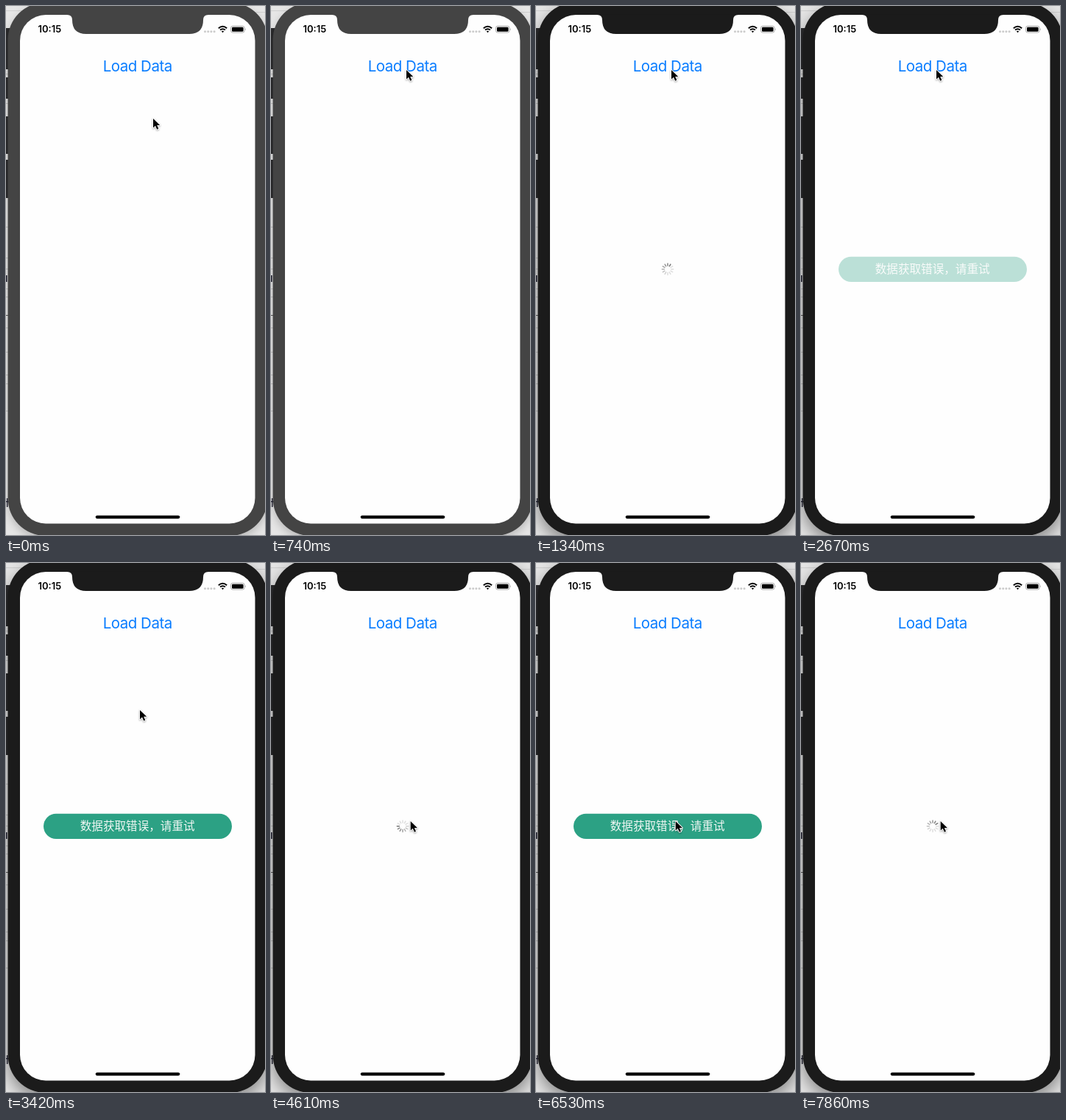
Recreate the animation shown at these times as an HTML page. Size 352 px wide and 719 px high, loop 8000 ms.

```html
<!DOCTYPE html>
<html lang="zh-CN">
<head>
<meta charset="utf-8">
<title>Load Data</title>
<style>
  html, body { margin: 0; width: 100%; height: 100%; overflow: hidden; background: #e6e6e6; }
  svg { display: block; width: 352px; height: 719px; }
  text { font-family: Inter, "Noto Sans", sans-serif; }
  #button { font-size: 20.5px; letter-spacing: -.5px; fill: #0a7dff; text-anchor: middle; }
  #clock { font-size: 13px; font-weight: 600; }
  #toast text { font: 15.6px "Noto Sans CJK SC", "Noto Sans CJK", sans-serif; fill: #f0f7f4; }
  #phone { fill: #444; filter: drop-shadow(0 5px 6px rgba(0, 0, 0, .2)); }
  .active #phone { fill: #1b1b1b; filter: drop-shadow(0 9px 11px rgba(0, 0, 0, .42)); }
  .active #notch { fill: #1b1b1b; }
  #notch { fill: #444; }
  #cursor { filter: drop-shadow(0 1px .8px rgba(0, 0, 0, .35)); }
</style>
</head>
<body>
<svg id="stage" viewBox="0 0 352 719">
  <!-- desktop behind the phone -->
  <rect width="352" height="719" fill="#e6e6e6"/>
  <path d="M0 6.5H40M310 8.5H352" stroke="#cfcfcf"/>
  <path d="M0 30h6v56h-6zM0 97h6v29h-6zM0 150h6v51h-6zM0 209h6v52h-6z" fill="#2a2a2c"/>
  <path id="rules" stroke="#c2c2c2"/>
  <path d="M0 420.5h4" stroke="#555"/>
  <path d="M0 366h1.5v9h-1.5zM1 669h1.4v12h-1.4zM0 673h3v1.3h-3z" fill="#1c1c2c"/>

  <rect id="phone" x="2.5" y="-5" width="353" height="725" rx="51"/>
  <rect x="19" y="12" width="319.5" height="691.5" rx="35" fill="#fefefe"/>
  <path id="notch" d="M83 11.5v.5q7 0 7 7q0 19 19 19H249q19 0 19-19q0-7 7-7v-.5z"/>

  <!-- status bar -->
  <text id="clock" x="43.5" y="36">10:15</text>
  <g fill="#cbcbcb">
    <circle cx="270.5" cy="34.7" r="1.5"/><circle cx="274.7" cy="34.7" r="1.5"/>
    <circle cx="278.9" cy="34.7" r="1.5"/><circle cx="283.1" cy="34.7" r="1.5"/>
  </g>
  <g fill="none" stroke="#000" stroke-width="1.9">
    <path d="M288.8 30.2q5.7-4.8 11.4 0M291 32.6q3.5-2.9 7 0"/>
    <path d="M294.5 36.2l-1.7-1.8q1.7-1.2 3.4 0z" fill="#000" stroke="none"/>
  </g>
  <rect x="305.5" y="27.3" width="18.6" height="8.8" rx="2.5" fill="none" stroke="#a2a2a2" stroke-width=".9"/>
  <rect x="307" y="28.7" width="15.6" height="6" rx="1.3"/>
  <path d="M325.2 30.2q1.6 1.5 0 3z" fill="#a2a2a2"/>

  <text id="button" x="178.7" y="88.5">Load Data</text>
  <g id="spinner" stroke="#5c5c5c" stroke-width="1.5" stroke-linecap="round"></g>
  <g id="toast">
    <rect x="51" y="340.7" width="256" height="34.3" rx="17.15" fill="#2ca184"/>
    <text x="100.7" y="363">数据获取错误，请重试</text>
  </g>
  <rect x="121.7" y="692.4" width="114.6" height="4.4" rx="2.2"/>
  <path id="cursor" d="M0 0v12.5l3-2.8l2.2 5l2.1-.9l-2.1-4.9h4z"
        stroke="#fff" stroke-width="1.8" stroke-linejoin="round" paint-order="stroke"/>
</svg>
<script>
const LOOP = 8000;
const TICK = 148.3;         // the screen refreshes in coarse ticks
const ACTIVATE = 885;       // the window gains focus and the button is pressed
const TAPS = [1035, 4595, 7410];
const REQUEST = 1500;       // time from a tap to the error message
const FADE = 430;
const SPOKES = 12;

// time, x, y
const CURSOR = [
  [0, 200, 153], [740, 184, 87], [3263, 184, 87], [3411, 182, 200],
  [3559, 179, 262], [3708, 181, 315], [3856, 187, 343], [4004, 189.7, 351]
];

const $ = id => document.getElementById(id);
const clamp = v => Math.max(0, Math.min(1, v));

$('rules').setAttribute('d',
  [92, 132, 300, 342, 357, 384, 395, 437, 470, 501, 513, 550].map(y => `M0 ${y}.5h5`).join(''));

const spokes = Array.from({ length: SPOKES }, (_, i) => {
  const line = document.createElementNS('http://www.w3.org/2000/svg', 'path');
  line.setAttribute('d', 'M0-4.7V-7.7');
  line.setAttribute('transform', `translate(179 357.7) rotate(${i * 360 / SPOKES})`);
  return $('spinner').appendChild(line);
});

function cursorAt(t) {
  const next = CURSOR.findIndex(key => key[0] > t);
  if (next < 0) return CURSOR.at(-1).slice(1);
  const [t0, x0, y0] = CURSOR[next - 1], [t1, x1, y1] = CURSOR[next];
  const k = (t - t0) / (t1 - t0);
  return [x0 + (x1 - x0) * k, y0 + (y1 - y0) * k];
}

function drawSpinner(elapsed) {
  const lead = Math.round(SPOKES * (.75 + elapsed / 1000));
  spokes.forEach((spoke, i) => {
    const age = (lead - i + SPOKES) % SPOKES;
    spoke.setAttribute('opacity', Math.max(.2, .85 - age * .095));
  });
}

function render(time) {
  const t = Math.floor((time % LOOP + 6) / TICK) * TICK;
  const tap = TAPS.findLast(start => start <= t);
  const elapsed = tap === undefined ? -1 : t - tap;
  const loading = elapsed >= 0 && elapsed < REQUEST;

  $('stage').classList.toggle('active', t >= ACTIVATE);
  $('button').setAttribute('opacity', t < ACTIVATE ? 1 : t < TAPS[0] ? .25 : clamp(.5 + (t - TAPS[0]) / 290));
  $('spinner').setAttribute('visibility', loading ? 'visible' : 'hidden');
  if (loading) drawSpinner(elapsed);
  $('toast').setAttribute('opacity', clamp((elapsed - REQUEST) / FADE));
  $('cursor').setAttribute('transform', `translate(${cursorAt(t)})`);
}

const start = performance.now();
function loop() {
  render(performance.now() - start);
  requestAnimationFrame(loop);
}
loop();
</script>
</body>
</html>
```
